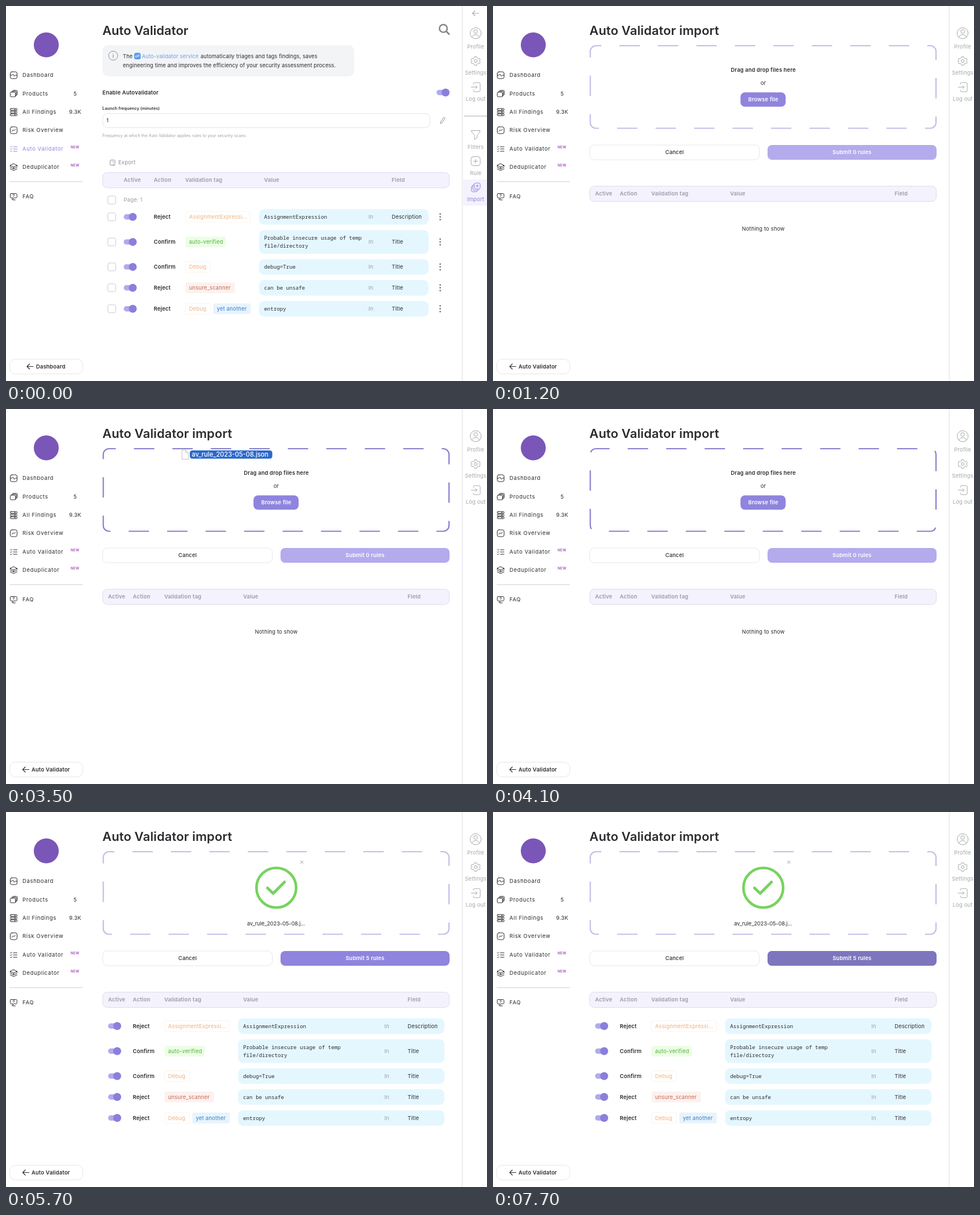
Recreate the animation shown at these times as an HTML page. Size 848x661 px, loop 7.9 s.

```html
<!DOCTYPE html>
<html lang="en">
<head>
<meta charset="utf-8">
<title>Rule import</title>
<style>
html, body { margin: 0; width: 100%; height: 100%; overflow: hidden; background: #fff; }
svg { display: block; }
text { font-family: Inter, "Open Sans", sans-serif; }
.mono { font-family: "Noto Sans Mono", "DejaVu Sans Mono", monospace; }
</style>
</head>
<body>
<svg id="stage" width="848" height="661" viewBox="0 0 848 661"></svg>
<script>
const INK = '#2b2b2f', GREY = '#9a9ca8', PALE = '#a6a7ae', VIOLET = '#8f84de';
const LOOP = 7900;

// y is the middle of the capitals
function text(x, y, str, { size = 9.5, fill = INK, weight = 400, gap = .15, anchor = 'start', cls = '' } = {}) {
  return `<text x="${x}" y="${y + size * .36}" class="${cls}" font-size="${size}" fill="${fill}" font-weight="${weight}"
    letter-spacing="${gap}" text-anchor="${anchor}">${str}</text>`;
}
const bold = (x, y, str, o) => text(x, y, str, { weight: 600, gap: .19, ...o });
const mid = (x, y, str, o) => text(x, y, str, { anchor: 'middle', ...o });
const mono = (x, y, str) => text(x, y, str, { size: 9.25, weight: 500, gap: 0, cls: 'mono' });

function box(x, y, w, h, r, fill, stroke = 'none', extra = '') {
  return `<rect x="${x}" y="${y}" width="${w}" height="${h}" rx="${r}" fill="${fill}" stroke="${stroke}" ${extra}/>`;
}
function line(d, stroke = INK, width = 1) {
  return `<path d="${d}" fill="none" stroke="${stroke}" stroke-width="${width}" stroke-linecap="round" stroke-linejoin="round"/>`;
}
const dot = (x, y, r, fill, stroke = 'none', width = 1) =>
  `<circle cx="${x}" cy="${y}" r="${r}" fill="${fill}" stroke="${stroke}" stroke-width="${width}"/>`;
const group = (id, body) => `<g id="${id}">${body}</g>`;
const at = (x, y, body) => `<g transform="translate(${x} ${y})">${body}</g>`;

const toggle = (x, y) => box(x, y - 4.7, 20, 9.4, 4.7, '#b1aaec') + dot(x + 16, y, 7, '#8a7fdc');
const checkbox = y => box(179.5, y - 7, 14, 14, 3, '#fff', '#c8cad2');
const backArrow = (x, y, color, width) => line(`M${x + 11} ${y}H${x}m4.5-4.5L${x} ${y}l4.5 4.5`, color, width);

// Menu icons, centred on the origin
const slot = y => `M-4.8 ${y}H4.8q1.2 0 1.2 1.2v1q0 1.2-1.2 1.2H-4.8q-1.2 0-1.2-1.2v-1q0-1.2 1.2-1.2ZM-3.6 ${y + 1.7}h.1M1 ${y + 1.7}h2.6`;
const icons = {
  pulse: 'M-3-6H3Q6-6 6-3V3Q6 6 3 6H-3Q-6 6-6 3V-3Q-6-6-3-6ZM-6 0H-3L-1-2 1 2 3 0H6',
  boxes: 'M-6-1.5Q-6-2.5-5-2.5H2Q3-2.5 3-1.5V4.5Q3 5.5 2 5.5H-5Q-6 5.5-6 4.5ZM-4.5-2.5L-3-4.2H3.5Q4.7-4.2 4.7-3V3.5L3 5M-2.5-4.2L-1-5.8H5Q6.3-5.8 6.3-4.5V1.5L4.7 3.3',
  server: [-6.3, -1.7, 2.9].map(slot).join(''),
  trend: 'M-3-6H3Q6-6 6-3V3Q6 6 3 6H-3Q-6 6-6 3V-3Q-6-6-3-6ZM-3.2 2L-1-.7 .8 .7 3.2-2',
  checks: 'M-6-4l1 1 2-2M-6 0l1 1 2-2M-6 4l1 1 2-2M-.5-3.8H6M-.5 0H6M-.5 4H6',
  layers: 'M0-6L6-3 0 0-6-3ZM-6-3V-1.5M6-3V-1.5M-6 0L0 3 6 0M-6 3L0 6 6 3M0 0V3',
  chat: 'M-4.5-5.5H4Q5.8-5.5 5.8-3.7V.5Q5.8 2.2 4 2.2H1L-1.5 4.5V2.2H-4.2Q-6 2.2-6 .5V-3.7Q-6-5.5-4.5-5.5ZM-1.5-2.8Q-1.3-4 0-4T1.4-2.7Q1.3-1.8 0-1.2M0 .4V.5M-3.5 4.5Q-2 6-.5 5.8H3'
};
function menuItem(icon, y, label, { count, isNew, color = INK } = {}) {
  return at(13.5, y, line(icons[icon], color)) +
    text(29, y, label, { gap: .66, fill: color }) +
    (count ? mid(122, y, count, { gap: .3 }) : '') +
    (isNew ? text(114, y - 2.8, 'NEW', { size: 6, weight: 700, gap: .3, fill: '#b05fc4' }) : '');
}

function sideLabel(y, label, fill = PALE) {
  return mid(828, y, label, { fill });
}
const gear = 'M-1.8-7.5H1.8L2.6-5.3 4.6-4.2 6.8-4.6 8-1.8 6.6 0 8 1.8 6.8 4.6 4.6 4.2 2.6 5.3 1.8 7.5H-1.8L-2.6 5.3-4.6 4.2-6.8 4.6-8 1.8-6.6 0-8-1.8-6.8-4.6-4.6-4.2-2.6-5.3Z';

function frame() {
  return dot(71, 68.5, 22, '#7a56b8') +
    menuItem('pulse', 122, 'Dashboard') +
    menuItem('boxes', 154.5, 'Products', { count: '5' }) +
    menuItem('server', 187, 'All Findings', { count: '9.3K' }) +
    menuItem('trend', 219, 'Risk Overview') +
    menuItem('layers', 284, 'Deduplicator', { isNew: true }) +
    line('M7 309.5H135', '#dcdce1', 1.4) +
    menuItem('chat', 336, 'FAQ') +
    box(6.5, 622.5, 129, 26, 10, '#fff', '#e6e6eb') +
    box(803.5, 0, 2, 661, 0, '#ededf0') +
    dot(828, 48, 9.7, 'none', PALE) + dot(828, 45, 3.3, 'none', PALE) +
    line('M821.5 55Q822.5 50.5 828 50.5T834.5 55', PALE) + sideLabel(71.5, 'Profile') +
    at(828, 97, line(gear, PALE) + dot(0, 0, 2.6, 'none', PALE)) + sideLabel(118, 'Settings') +
    line('M824 138V137.5Q824 135 826.5 135H833.5Q836 135 836 137.5V148.5Q836 151 833.5 151H826.5Q824 151 824 148.5V148M820 143H830.5M827.5 140L830.5 143 827.5 146', PALE) +
    sideLabel(164, 'Log out');
}

// background, ink, width and optional edge of each kind of tag
const tags = {
  'AssignmentExpressi...': ['#fff', '#f2b17d', 115, '#fbf3ee'],
  'auto-verified': ['#ecfee6', '#52b238', 72],
  'Debug': ['#fff', '#f2b17d', 45, '#fbf3ee'],
  'unsure_scanner': ['#fdf1ee', '#c56b54', 88],
  'yet another': ['#e7f4fd', '#3b7dc6', 67]
};
function tag(x, y, label) {
  const [bg, ink, w, edge] = tags[label];
  return box(x + .5, y - 9.5, w - 1, 19, 3, bg, edge) + text(x + 6.8, y, label, { fill: ink });
}

const rules = [
  ['Reject', ['AssignmentExpressi...'], ['AssignmentExpression'], 'Description'],
  ['Confirm', ['auto-verified'], ['Probable insecure usage of temp', 'file/directory'], 'Title'],
  ['Confirm', ['Debug'], ['debug=True'], 'Title'],
  ['Reject', ['unsure_scanner'], ['can be unsafe'], 'Title'],
  ['Reject', ['Debug', 'yet another'], ['entropy'], 'Title']
];
const rowY = [0, 44.2, 88.2, 125, 162];
const listCols = { active: 207.5, action: 260.5, tag: 316, value: 455, right: 745, in: 639, field: 680 };
const importCols = { active: 180, action: 223.5, tag: 279, value: 418, right: 773, in: 667, field: 708 };

function header(y, c) {
  const h = (x, s) => bold(x, y, s, { fill: GREY });
  return box(170.5, y - 13.5, 611, 27, 8, '#f4f2fd', '#dedbee') + h(c.active, 'Active') + h(c.action, 'Action') +
    h(c.tag, 'Validation tag') + h(c.value, 'Value') + h(c.field, 'Field');
}
function rows(top, c, extra = () => '') {
  return rules.map(([action, labels, value, field], i) => {
    const y = top + rowY[i], two = value.length > 1, h = two ? 42 : 27.5, left = c.value - 9;
    let x = c.tag;
    const tagRow = labels.map(l => { const s = tag(x, y, l); x += tags[l][2] + 4; return s; }).join('');
    return toggle(c.active, y) + bold(c.action, y, action) + tagRow +
      box(left, y - h / 2, c.right - left, h, 9, '#e5f7fe') +
      value.map((v, n) => mono(c.value, y + (two ? n * 14 - 7 : 0), v)).join('') +
      text(c.in, y, 'In', { fill: GREY }) + text(c.field, y, field) + extra(y);
  }).join('');
}

function listPage() {
  const info = { size: 9.4, gap: .09 };
  return text(170, 43, 'Auto Validator', { size: 22, weight: 600, gap: .05 }) +
    dot(771, 39.5, 6.8, 'none', '#88888c', 2.6) + line('M776 44.5L781 49.5', '#88888c', 3) +
    box(170, 69, 444, 55, 10, '#f3f4f6') +
    dot(189, 87.5, 8, 'none', '#8c8f9a') + line('M189 86.5V91M189 83.8V84', '#8c8f9a', 1.2) +
    text(206, 88.5, 'The', info) + box(226, 82.5, 11.5, 11.5, 3.5, '#5a9ae8') +
    line('M230.8 88.5l2-2q1.2-1 2 0t0 1.8l-1.4 1.4M232.6 88l-2 2q-1.2 1-2 0t0-1.8l1.4-1.4', '#fff') +
    text(239.5, 88.5, 'Auto-validator service', { ...info, fill: '#6f9fe8' }) +
    text(343, 88.5, 'automatically triages and tags findings, saves', info) +
    text(206, 105, 'engineering time and improves the efficiency of your security assessment process.', info) +
    bold(170, 152.5, 'Enable Autovalidator') + toggle(759, 152.5) +
    bold(170, 180, 'Launch frequency (minutes)', { size: 7.2, gap: .12 }) +
    box(170.5, 189.5, 576.5, 25, 8, '#fff', '#e3e4ea') + text(177, 202, '1') +
    line('M766 207L766.6 204 771.5 196.7Q772.5 195.8 773.5 196.8T773.8 198.5L768.6 205.6Z', '#8b8b92') +
    text(170, 228.5, 'Frequency at which the Auto Validator applies rules to your security scans.', { size: 7, gap: .1, fill: GREY }) +
    line('M186 271.5H185Q183.5 271.5 183.5 273V279Q183.5 280.5 185 280.5H188M186 271.5H190.5Q192.5 271.5 192.5 273.5V275M188 274.5Q191.5 273.5 191.5 277M189 281L193 278M191 281H189V279', '#92949c') +
    text(198, 276, 'Export', { fill: '#8f9199' }) +
    header(307, listCols) + checkbox(342) + text(207.5, 342, 'Page: 1', { fill: GREY }) +
    rows(371.7, listCols, y => checkbox(y) + [-5, 0, 5].map(d => dot(765.5, y + d, 1.4, '#777780')).join('')) +
    menuItem('checks', 252, 'Auto Validator', { isNew: true, color: VIOLET }) +
    backArrow(37, 635.5, INK, 1.2) + bold(53, 635.5, 'Dashboard') +
    backArrow(822.5, 13, PALE, 1.1) + line('M808 194H848', '#c6c6cc', 1.4) +
    line('M821 219.5H835.5V222L830.5 227.5V232.5L826 235.5V227.5L821 222Z', PALE) + sideLabel(248.5, 'Filters') +
    box(820, 265.5, 16, 16, 4, 'none', PALE) + line('M828 270V277M824.5 273.5H831.5', PALE) + sideLabel(294.5, 'Rule') +
    box(806, 306, 42, 46, 0, '#f4f2fd') +
    box(820.5, 317, 10.5, 10.5, 2.5, 'none', VIOLET) + box(823, 314.5, 10.5, 10.5, 2.5, '#f4f2fd', VIOLET) +
    box(825.5, 312, 10.5, 10.5, 2.5, '#f4f2fd', VIOLET) + line('M830.8 314.7V319.7M828.3 317.2H833.3', VIOLET) +
    sideLabel(341, 'Import', VIOLET);
}

function importPage() {
  const white = { fill: '#fff', weight: 600, gap: .19 };
  return text(170, 43, 'Auto Validator import', { size: 22, weight: 600, gap: .12 }) +
    box(171.5, 70, 609.5, 145.5, 10, 'none', '#c3bde6', 'id="zone" stroke-width="2.2" pathLength="1496" stroke-dasharray="36 32"') +
    box(170.5, 245, 299, 26, 8, '#fff', '#e6e6eb') + box(170.5, 245, 299, 26, 8, '#f3f4f6', '#e6e6eb', 'id="hover"') +
    mid(320, 258, 'Cancel', { weight: 500 }) +
    header(331, importCols) +
    menuItem('checks', 252, 'Auto Validator', { isNew: true }) +
    backArrow(29.5, 635.5, INK, 1.2) + bold(45, 635.5, 'Auto Validator') +
    group('waiting',
      mid(476.5, 113, 'Drag and drop files here', { weight: 600, gap: .18 }) + mid(476.5, 136, 'or') +
      box(436.3, 152.2, 79.6, 25.4, 8, VIOLET) + mid(476.5, 165, 'Browse file', white) +
      box(484, 245, 298, 26, 8, '#b3abec') + mid(633, 258, 'Submit 0 rules', white) +
      mid(476.5, 393, 'Nothing to show')) +
    group('loaded',
      dot(476.5, 133.5, 35, 'none', '#76d35f', 4.6) + line('M461 134L471 143.5 491 123.5', '#76d35f', 5) +
      line('M519.3 86.3L523.7 90.7M523.7 86.3L519.3 90.7', '#88888f', .9) +
      mid(476, 196.5, 'av_rule_2023-05-08.j...', { gap: -.1 }) +
      box(484, 245, 298, 26, 8, VIOLET) + box(484, 245, 298, 26, 8, '#7e76bd', 'none', 'id="press"') +
      mid(633, 258, 'Submit 5 rules', white) + rows(377.3, importCols)) +
    group('file',
      line('M1.5.5H8L12.5 5V16.5H1.5ZM8 .5V5H12.5', '#c2c2c6') +
      box(15, 1, 145.5, 14.5, 4.5, '#2b69cc') +
      text(18.5, 8.3, 'av_rule_2023-05-08.json', { size: 11.2, weight: 500, gap: 0, fill: '#fff' }));
}

const $ = id => document.getElementById(id);
$('stage').innerHTML = frame() + group('list', listPage()) + group('import', importPage());

const clamp = v => Math.max(0, Math.min(1, v));
const show = (id, on) => $(id).setAttribute('display', on ? 'inline' : 'none');

// Path of the dragged file: time, x, y
const drag = [[3200, 0, 100], [3300, 100, 86], [3400, 210, 78], [3500, 309, 72], [3700, 345, 92], [4000, 385, 126]];
function dragPoint(t) {
  const i = drag.findIndex(p => p[0] > t);
  const [a, b] = [drag[i - 1], drag[i]], k = (t - a[0]) / (b[0] - a[0]);
  return [1, 2].map(n => a[n] + (b[n] - a[n]) * k);
}

function draw() {
  const t = Math.floor(performance.now() % LOOP / 100) * 100;
  const over = t >= 3400 && t < 4200, dragging = t >= 3200 && t < 4000;
  show('list', t < 1200);
  show('import', t >= 1200);
  show('waiting', t < 4200);
  show('loaded', t >= 4200);
  show('file', dragging);
  if (dragging) $('file').setAttribute('transform', `translate(${dragPoint(t)})`);
  $('zone').setAttribute('stroke', over ? '#887dcc' : '#c3bde6');
  $('zone').setAttribute('stroke-dashoffset', 26.5 - (over ? (t - 3370) * .02 : 0));
  $('hover').setAttribute('opacity', t < 5200 ? 0 : clamp((5700 - t) / 400));
  $('press').setAttribute('opacity', clamp((t - 7300) / 400));
  requestAnimationFrame(draw);
}
draw();
</script>
</body>
</html>
```
